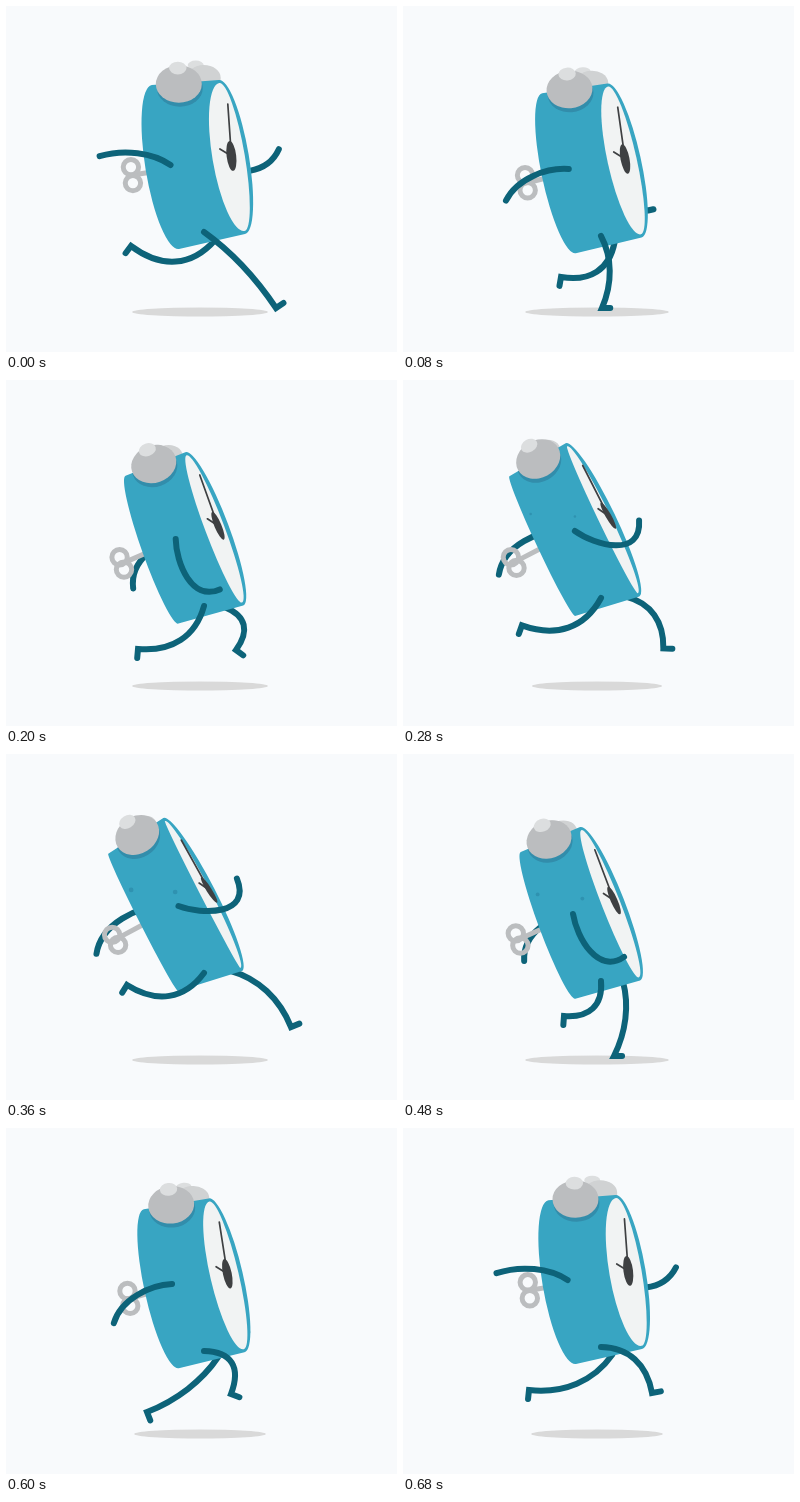
These frames come from a looping animation (391 by 346 pixels, 720 ms). An HTML page:

```html
<!DOCTYPE html>
<html lang="en">
<head>
<meta charset="utf-8">
<title>Running clock</title>
<style>
  html, body { margin: 0; width: 100%; height: 100%; overflow: hidden; background: #f8fafc; }
  svg { display: block; width: 100vw; height: 100vh; }
  .limb { fill: none; stroke: #0d6379; stroke-width: 6; stroke-linecap: round; stroke-linejoin: miter; }
  .ring { fill: none; stroke: #bbbdbf; stroke-width: 5; stroke-linecap: round; }
  .hand { stroke: #3e4042; stroke-width: 1.7; stroke-linecap: round; }
</style>
</head>
<body>
<svg viewBox="0 0 391 346">
  <clipPath id="clip"><path id="clipBody"/></clipPath>
  <ellipse id="shadow" cx="194" cy="306" ry="4.6" fill="#d9d9d9"/>
  <path id="farArm" class="limb"/>
  <path id="farLeg" class="limb"/>
  <line id="stem" class="ring"/>
  <circle id="ringA" class="ring" r="7.7"/>
  <circle id="ringB" class="ring" r="7.7"/>
  <ellipse id="backKnob" rx="8" ry="4.5" fill="#dcdedf"/>
  <ellipse id="backBell" rx="17" ry="13" fill="#d0d2d3"/>
  <path id="body" fill="#38a5c2"/>
  <path id="dial" fill="#f1f3f3"/>
  <line id="minute" class="hand"/>
  <line id="hour" class="hand"/>
  <ellipse id="hub" ry="15" fill="#3e4042"/>
  <circle id="dotA" fill="#2f92b0"/>
  <circle id="dotB" fill="#2f92b0"/>
  <g clip-path="url(#clip)"><ellipse id="bellShade" rx="23" ry="18.7" fill="#328dab"/></g>
  <ellipse id="bell" rx="23" ry="18.7" fill="#bbbdbf"/>
  <ellipse id="knob" rx="8.7" ry="6.4" fill="#dcdedf"/>
  <path id="nearLeg" class="limb"/>
  <path id="nearArm" class="limb"/>
</svg>
<script>
const LOOP = 720, STEP = 40, HIP_X = 198, FLOOR = 302, FOOT = 9;
const el = {};
document.querySelectorAll('[id]').forEach(e => el[e.id] = e);

// Each part relative to the hip: x, y upright, then x, y leaning.
const parts = {
  backTop: [-52, -147, -96, -119],
  faceTop: [15, -152, -41, -155],
  faceLow: [41, 2, 38, -2],
  backLow: [-25, 17, -26, 18],
  hub: [27.5, -76, 5, -83],
  minute: [24, -128, -23, -133],
  hour: [16, -83, -5, -90],
  bell: [-25, -148, -67, -138],
  knob: [-26, -164, -77, -151],
  backBell: [0, -154, -63, -143],
  backKnob: [-8, -167, -75, -149],
  ringA: [-73, -65, -92, -38],
  ringB: [-71, -49, -86, -28],
  stemIn: [-65, -58, -82, -37],
  stemOut: [-52, -60, -58, -50],
  dotA: [-46, -93, -73, -83],
  dotB: [0, -85, -29, -81]
};

// Time, hip height.
const bounce = [[0, 226], [80, 230], [200, 226], [280, 218], [360, 219],
  [480, 227], [600, 223], [640, 217.5], [680, 219]];
// Time, ankle x, ankle y, knee bend.
const nearSteps = [[0, 270, 302, 6], [80, 199, 302, 11], [200, 132, 269, 21], [360, 121, 231, 23],
  [480, 161, 262, 19], [600, 225, 266, 23], [680, 249, 265, 18]];
const farSteps = [[0, 125, 240, 25], [80, 158, 271, 20], [200, 230, 270, 18], [360, 285, 273, 13],
  [400, 292, 302, 8], [480, 211, 302, 9], [600, 141, 284, 9], [680, 126, 262, 17]];

// Smooth cyclic curve through the rows.
function sample(rows, t) {
  const n = rows.length;
  let i = n - 1;
  while (rows[i][0] > t) i--;
  const row = k => rows[(k + n) % n];
  const time = k => row(k)[0] + LOOP * Math.floor(k / n);
  const span = time(i + 1) - time(i), u = (t - time(i)) / span;
  return row(i).slice(1).map((a, j) => {
    const v = k => row(k)[j + 1];
    const slope = k => (v(k + 1) - v(k - 1)) / (time(k + 1) - time(k - 1)) * span;
    return a + u * u * (3 - 2 * u) * (v(i + 1) - a)
      + u * (1 - u) * ((1 - u) * slope(i) - u * slope(i + 1));
  });
}

const wave = (t, peak, period = LOOP) => Math.cos((t - peak) / period * 2 * Math.PI);
const mix = (a, b, u) => a + (b - a) * u;
const set = (name, attrs) => {
  for (const k in attrs) el[name].setAttribute(k, attrs[k]);
};
const line = (name, a, b) => set(name, { x1: a[0], y1: a[1], x2: b[0], y2: b[1] });
const place = (name, p, turn = 0) =>
  set(name, { transform: `translate(${p[0]} ${p[1]}) rotate(${turn})` });
const dist = (p, q) => Math.hypot(q[0] - p[0], q[1] - p[1]);
const angle = (p, q) => Math.atan2(q[1] - p[1], q[0] - p[0]) * 180 / Math.PI;
// Point a share of the way from p to q, pushed sideways (clockwise) by side.
function off(p, q, share, side = 0) {
  const dx = q[0] - p[0], dy = q[1] - p[1], k = side / Math.hypot(dx, dy);
  return [p[0] + dx * share - dy * k, p[1] + dy * share + dx * k];
}
// Half ellipse whose long axis runs from p to q.
const arc = (p, q, bulge) => `A${dist(p, q) / 2} ${bulge} ${angle(p, q)} 0 1 ${q}`;

// Swing is in degrees from straight down, positive to the left.
function arm(name, from, swing, reach, share, upper, lower) {
  const a = swing * Math.PI / 180;
  const to = [from[0] - reach * Math.sin(a), from[1] + reach * Math.cos(a)];
  set(name, { d: `M${from}C${off(from, to, 0.27, upper)},${off(from, to, share, lower)},${to}` });
}

// The foot stands at a right angle to the shin.
function leg(name, hip, steps, t) {
  const [x, y, bend] = sample(steps, t);
  const ankle = [x, Math.min(y, FLOOR)];
  const shin = off(hip, ankle, 0.66, -bend);
  const k = FOOT / dist(shin, ankle);
  const toe = [x + (ankle[1] - shin[1]) * k, Math.min(ankle[1] - (x - shin[0]) * k, FLOOR)];
  set(name, { d: `M${hip}C${off(hip, ankle, 0.3, -bend)},${shin},${ankle}L${toe}` });
}

function draw(t) {
  const c = wave(t, -15);
  const q = (1 - c) / 2;
  const lean = q - q * q * (1 - q) / 3;
  const y = sample(bounce, t)[0];
  const p = {};
  for (const k in parts) {
    const [x0, y0, x1, y1] = parts[k];
    p[k] = [HIP_X + mix(x0, x1, lean), y + mix(y0, y1, lean)];
  }

  const d = `M${p.backTop}L${p.faceTop}${arc(p.faceTop, p.faceLow, mix(17, 13, lean))}`
    + `L${p.backLow}${arc(p.backLow, p.backTop, mix(20, 3, lean))}Z`;
  set('body', { d });
  set('clipBody', { d });
  const top = off(p.faceTop, p.faceLow, 0.02), low = off(p.faceLow, p.faceTop, 0.02);
  set('dial', {
    d: `M${top}${arc(top, low, mix(13, 8.5, lean))}${arc(low, top, mix(19.5, 2, lean))}Z`
  });

  line('minute', p.hub, p.minute);
  line('hour', p.hub, p.hour);
  set('hub', { rx: mix(4.8, 2.6, lean) });
  place('hub', p.hub, angle(p.minute, p.hub) - 93);

  const tilt = -32 * lean;
  for (const name of ['bell', 'knob', 'backBell', 'backKnob']) place(name, p[name], tilt);
  place('bellShade', [p.bell[0] + 1, p.bell[1] + 4], tilt);
  place('ringA', p.ringA);
  place('ringB', p.ringB);
  line('stem', p.stemIn, p.stemOut);
  for (const name of ['dotA', 'dotB']) {
    place(name, p[name]);
    set(name, { r: 2.5 * Math.max(0, wave(t, 400)) });
  }

  set('shadow', { rx: 68.5 + 3.5 * wave(t, 100, LOOP / 2) });
  arm('nearArm', [168.5 - 4 * c, y - 67], 107 * c - 9, 68 + 3.5 * c,
    0.82 - 0.15 * c, 14 - 4 * c, 25 - 15 * c);
  arm('farArm', [183 + 24 * c, y - 67], 25 - 80 * c - 50 * c * c, 66 - 8 * c + 10 * c * c,
    0.75, 16, 22);
  leg('nearLeg', [HIP_X, y], nearSteps, t);
  leg('farLeg', [217 - 8 * c, y + 3 + 5 * c], farSteps, t);
}

let start;
function tick(now) {
  if (start === undefined) start = now;
  draw(Math.floor((now - start) % LOOP / STEP) * STEP);
  requestAnimationFrame(tick);
}
draw(0);
requestAnimationFrame(tick);
</script>
</body>
</html>
```
